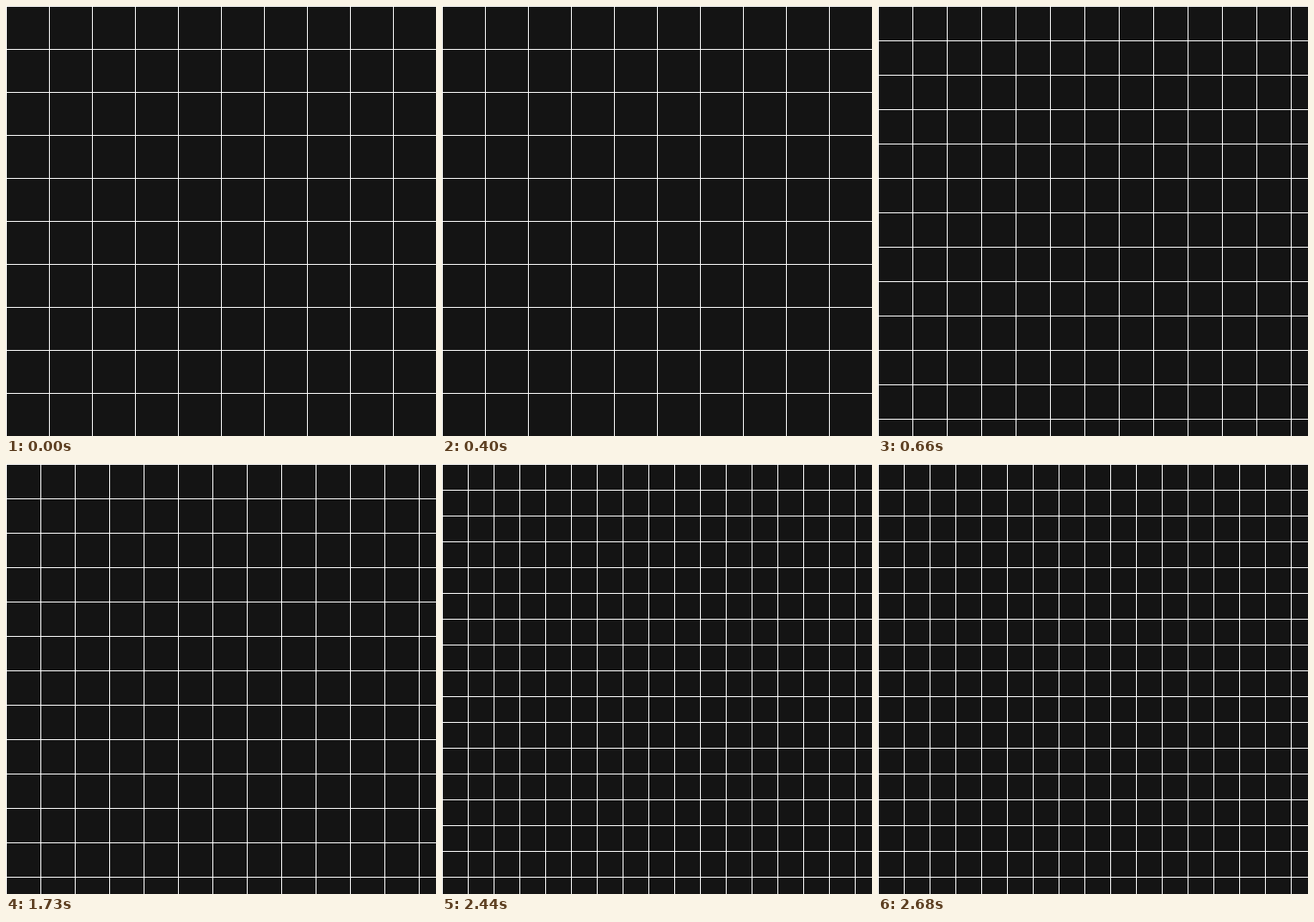
An HTML page for the animation above (2840 ms loop, 500 by 500 pixels).

```html
<!DOCTYPE html>
<html lang="en">
<head>
<meta charset="utf-8">
<title>Grid sizes</title>
<style>
  html, body {
    margin: 0;
    width: 100%;
    height: 100%;
    overflow: hidden;
    background: #141414;
  }

  .grid {
    width: 500px;
    height: 500px;
    background-image:
      linear-gradient(to right, #fff 1px, transparent 1px),
      linear-gradient(to bottom, #fff 1px, transparent 1px);
    background-size: 50px 50px;
    animation: cell 2840ms step-end infinite;
  }

  /* Hard cuts at 660 ms and 2440 ms */
  @keyframes cell {
    0% { background-size: 50px 50px; }
    23.23944% { background-size: 40px 40px; }
    85.91549% { background-size: 30px 30px; }
    100% { background-size: 30px 30px; }
  }
</style>
</head>
<body>
<div class="grid"></div>
</body>
</html>
```
